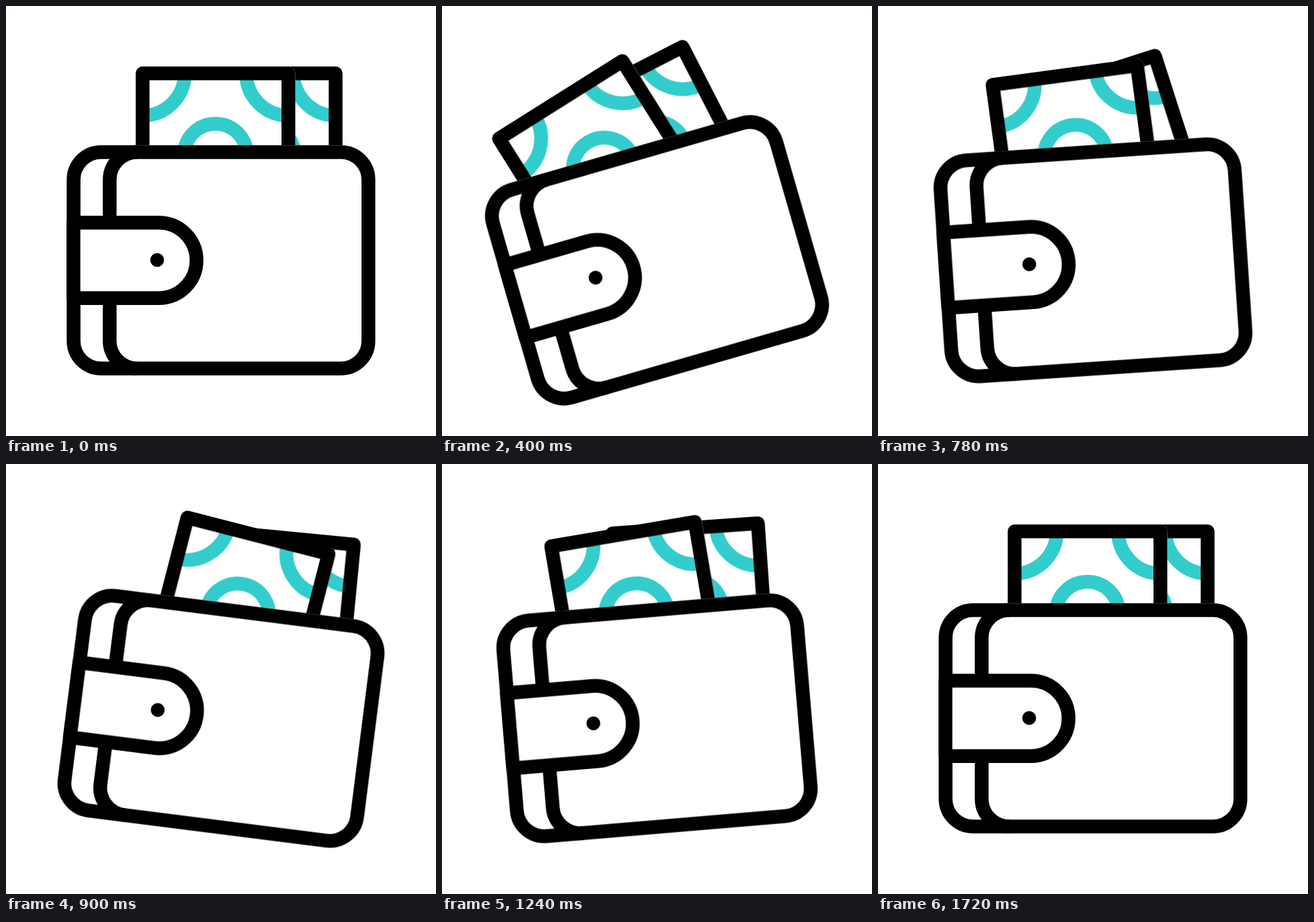
These frames come from a looping animation (640 px wide and 640 px high, 2 s). An HTML page:

```html
<!DOCTYPE html>
<html lang="en">
<head>
<meta charset="utf-8">
<title>Wallet</title>
<style>
  html, body { margin: 0; width: 100%; height: 100%; overflow: hidden; background: #fff; }
  svg { display: block; width: 100vw; height: 100vh; }
  .line { fill: none; stroke: #000; stroke-width: 20.5; stroke-linejoin: round; }
  .base { fill: #fff; stroke: #fff; stroke-width: 20.5; stroke-linejoin: round; }
  .print { fill: none; stroke: #33cccc; stroke-width: 20.5; }
  #wallet { transform-origin: 320px 378.5px; }
  #front { transform-origin: 312px 329.2px; }
  #back { transform-origin: 382.4px 329.2px; }
</style>
</head>
<body>
<svg viewBox="0 0 640 640">
  <defs>
    <g id="note">
      <rect class="base" x="203.3" y="100.3" width="217" height="260"/>
      <path class="print" d="M266.1 100.3A62.8 62.8 0 0 1 203.3 163.1M357.5 100.3A62.8 62.8 0 0 0 420.3 163.1"/>
      <circle class="print" cx="311.8" cy="222" r="46.8"/>
      <rect class="line" x="203.3" y="100.3" width="217" height="260"/>
    </g>
  </defs>
  <g id="wallet">
    <g id="back"><use href="#note" x="70.3"/></g>
    <g id="front"><use href="#note"/></g>
    <rect class="base" x="100.6" y="217.6" width="438.8" height="321.8" rx="41"/>
    <rect class="line" x="100.6" y="217.6" width="438.8" height="321.8" rx="41"/>
    <path class="line" d="M195.3 217.6A41 41 0 0 0 154.3 258.6V498.4A41 41 0 0 0 195.3 539.4"/>
    <path class="line" style="fill:#fff" d="M100.4 322.5H227.5A56.1 56.1 0 0 1 227.5 434.7H100.4Z"/>
    <circle cx="225" cy="378" r="10.3"/>
  </g>
</svg>
<script>
  const LOOP = 2000;
  // [time in ms, degrees] of the damped swing
  const SWING = [[0, 0], [560, -20], [980, 10], [1260, -5], [1440, 2.5], [1620, 0]];

  function swing(id, lag) {
    const steps = SWING.map(([ms, deg]) => [ms + lag, deg]);
    if (lag) steps.unshift([0, 0]);
    steps.push([LOOP, 0]);
    const frames = steps.map(([ms, deg]) => ({
      offset: ms / LOOP,
      transform: `rotate(${deg}deg)`,
      easing: "cubic-bezier(0.3333, 0, 0.6667, 1)"
    }));
    document.getElementById(id).animate(frames, { duration: LOOP, iterations: Infinity });
  }

  swing("wallet", 0);
  swing("front", 0);
  swing("back", 100);
</script>
</body>
</html>
```
